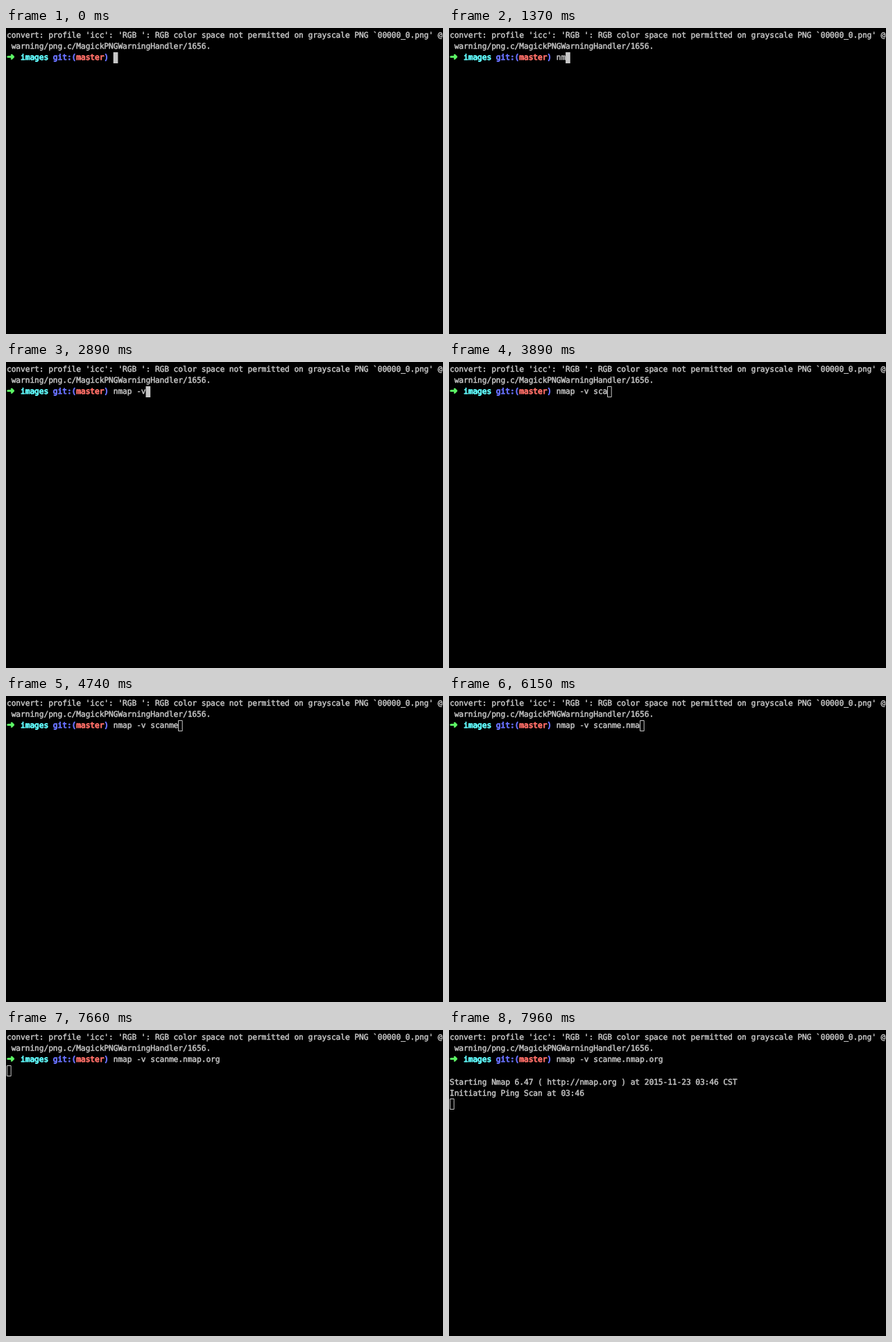
Animation, 630 px wide and 442 px high, one loop 7.99 s. Source, as an HTML page with a canvas:

```html
<!DOCTYPE html>
<html lang="en">
<head>
<meta charset="utf-8">
<title>Terminal session</title>
<style>
  html, body { margin: 0; width: 100%; height: 100%; overflow: hidden; background: #000; }
  canvas { display: block; }
</style>
</head>
<body>
<canvas id="screen" width="630" height="442"></canvas>
<script>
const ctx = document.getElementById("screen").getContext("2d");
ctx.textRendering = "geometricPrecision";
ctx.lineJoin = "round";

const LOOP = 7990;
const CELL = { width: 6.684, height: 16.2, left: 1, top: 2.3 };
const FONT = "11.3px 'DejaVu Sans Mono', monospace";
const ARROW_FONT = "14px 'DejaVu Sans', sans-serif";
const REGULAR = 0.45, BOLD = 0.95; // outline widths that thicken the glyphs
const GRAY = "#c7c7c7", GREEN = "#5ffa68", CYAN = "#60fdff", BLUE = "#6871ff", RED = "#ff6e67";

const COMMAND = "nmap -v scanme.nmap.org";
const KEY_TIMES = [
  130, 1370, 1540, 1710, 1780, 2410, 2890, 3000, 3260, 3710, 3890, 4060,
  4160, 4740, 4820, 5120, 5750, 6150, 6310, 6380, 6680, 6910, 7010
];
const PROMPT_ROW = 2, PROMPT_COLUMNS = 23;
const BLUR_TIME = 3710; // the window loses focus, so the cursor turns hollow
const ENTER_TIME = 7660;
const OUTPUT = [
  { time: 7860, row: 4, text: "Starting Nmap 6.47 ( http://nmap.org ) at 2015-11-23 03:46 CST" },
  { time: 7960, row: 5, text: "Initiating Ping Scan at 03:46" }
];

const cellX = column => CELL.left + column * CELL.width;
const cellY = row => CELL.top + row * CELL.height;
const baseline = row => Math.round(cellY(row) + 11.7);

function write(row, column, text, color = GRAY, weight = REGULAR, font = FONT) {
  ctx.font = font;
  ctx.fillStyle = ctx.strokeStyle = color;
  ctx.lineWidth = weight;
  [...text].forEach((char, i) => {
    const x = cellX(column + i), y = baseline(row);
    ctx.fillText(char, x, y);
    ctx.strokeText(char, x, y);
  });
}

function drawPrompt() {
  write(PROMPT_ROW, 0, "➜", GREEN, BOLD, ARROW_FONT);
  write(PROMPT_ROW, 3, "images", CYAN, BOLD);
  write(PROMPT_ROW, 10, "git:(", BLUE, BOLD);
  write(PROMPT_ROW, 15, "master", RED, BOLD);
  write(PROMPT_ROW, 21, ")", BLUE, BOLD);
}

function drawCursor(row, column, hollow) {
  const x = cellX(column), y = Math.round(cellY(row));
  if (hollow) {
    ctx.strokeStyle = GRAY;
    ctx.lineWidth = 1;
    ctx.strokeRect(Math.round(x) + 0.5, y + 0.5, CELL.width - 1, 15);
  } else {
    ctx.fillStyle = GRAY;
    ctx.fillRect(x, y, CELL.width, 16);
  }
}

function draw(time) {
  ctx.fillStyle = "#000";
  ctx.fillRect(0, 0, 630, 442);

  write(0, 0, "convert: profile 'icc': 'RGB ': RGB color space not permitted on grayscale PNG `00000_0.png' @");
  write(1, 1, "warning/png.c/MagickPNGWarningHandler/1656.");
  drawPrompt();

  const typed = KEY_TIMES.filter(t => t <= time).length;
  write(PROMPT_ROW, PROMPT_COLUMNS, COMMAND.slice(0, typed));

  const cursor = time < ENTER_TIME
    ? { row: PROMPT_ROW, column: PROMPT_COLUMNS + typed }
    : { row: PROMPT_ROW + 1, column: 0 };
  for (const line of OUTPUT.filter(line => line.time <= time)) {
    write(line.row, 0, line.text);
    cursor.row = line.row + 1;
  }
  drawCursor(cursor.row, cursor.column, time >= BLUR_TIME);
}

const start = performance.now();
function tick() {
  draw((performance.now() - start) % LOOP);
  requestAnimationFrame(tick);
}
tick();
</script>
</body>
</html>
```
